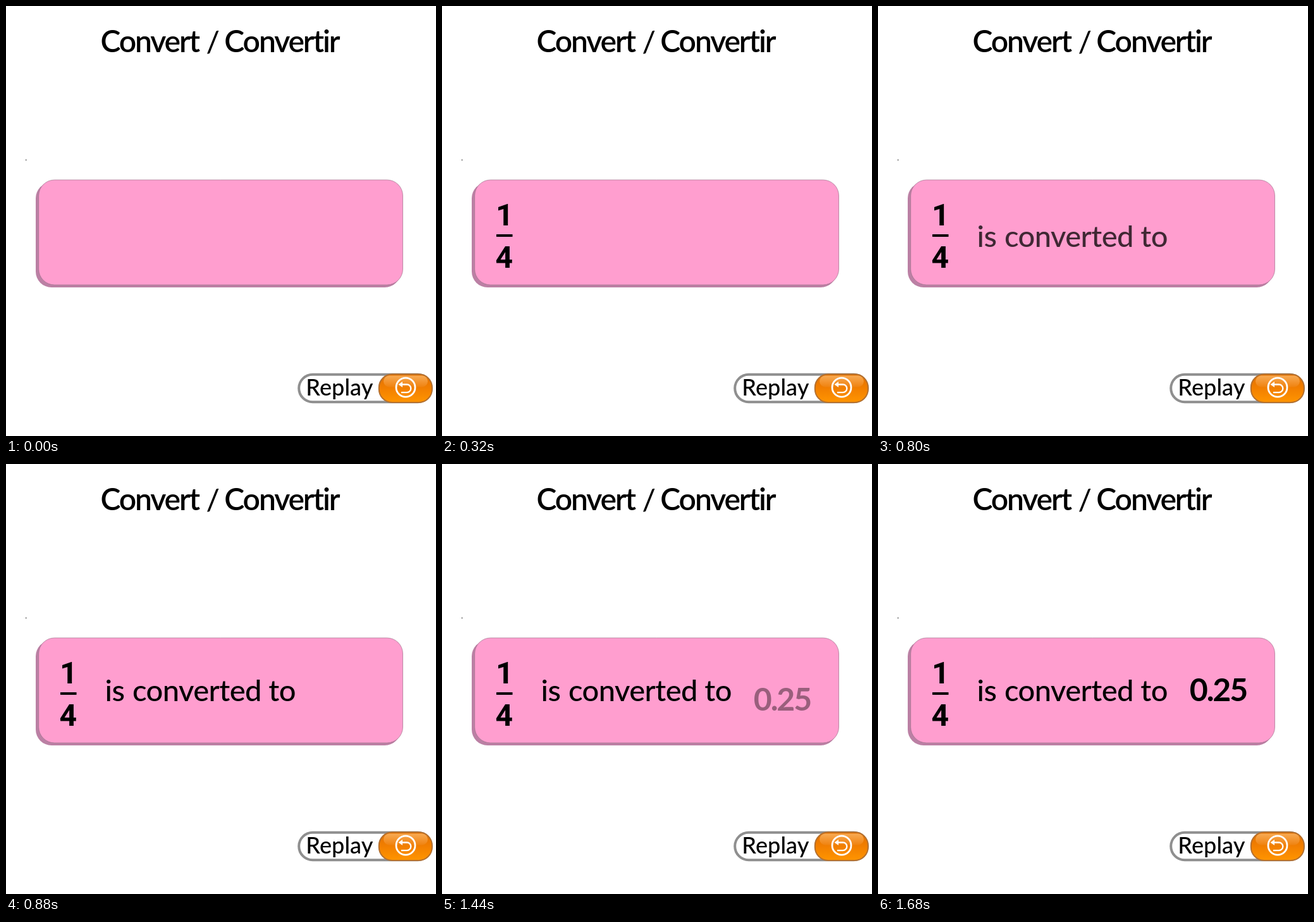
An HTML page with a canvas that plays this animation: 680x680 px, repeating every 2.48 s.

```html
<!DOCTYPE html>
<html lang="en">
<head>
<meta charset="utf-8">
<title>Convert / Convertir</title>
<style>
  html, body { margin: 0; width: 100%; height: 100%; overflow: hidden; background: #fff; }
  canvas { display: block; width: 100%; height: 100%; }
</style>
</head>
<body>
<canvas id="stage" width="680" height="680"></canvas>
<script>
const ctx = document.getElementById('stage').getContext('2d');
const LOOP = 2480, STEP = 80, RISE = 20;

const REGULAR = 'Lato, sans-serif';
const DIGITS = 'Roboto, sans-serif';

// Draws text with its ink centred on cx.
function text(str, cx, baseline, size, weight, family = REGULAR, spacing = 0) {
  ctx.font = `${weight} ${size}px ${family}`;
  ctx.letterSpacing = `${spacing}px`;
  const m = ctx.measureText(str);
  const x = cx + (m.actualBoundingBoxLeft - m.actualBoundingBoxRight) / 2;
  ctx.fillText(str, x, baseline);
}

function pill(x, y, w, h, r, fill, stroke, line = 1) {
  ctx.beginPath();
  ctx.roundRect(x, y, w, h, r);
  ctx.fillStyle = fill;
  ctx.fill();
  if (!stroke) return;
  ctx.strokeStyle = stroke;
  ctx.lineWidth = line;
  ctx.stroke();
}

function fade(y0, y1, ...colors) {
  const g = ctx.createLinearGradient(0, y0, 0, y1);
  colors.forEach((c, i) => g.addColorStop(i / (colors.length - 1), c));
  return g;
}

// Fades and lifts a part into place in a fixed number of hard steps.
function reveal(t, start, steps, draw) {
  const k = Math.min(steps, Math.floor((t - start) / STEP) + 1);
  if (k < 1) return;
  ctx.save();
  ctx.globalAlpha = k / steps;
  ctx.translate(0, RISE * (steps - k) / (steps - 1));
  ctx.fillStyle = '#000';
  draw();
  ctx.restore();
}

function title() {
  ctx.fillStyle = '#000';
  text('Convert', 229.5, 73, 48, 600, REGULAR, -2.1);
  text('/', 327, 73, 47, 500);
  text('Convertir', 438, 73, 48, 600, REGULAR, -2.1);
}

function panel() {
  pill(47, 279, 577, 166, 25, '#bb80a4');
  pill(51.7, 275, 575.8, 166, 25, '#ff9ecf', '#a0708c', 0.7);
  ctx.fillStyle = '#555';
  ctx.fillRect(31, 242.5, 1.3, 2);
}

function replayIcon() {
  ctx.strokeStyle = ctx.fillStyle = '#fff';
  ctx.lineWidth = 2.8;
  ctx.beginPath();
  ctx.arc(632, 603.2, 15, 0, Math.PI * 2);
  ctx.stroke();

  ctx.lineWidth = 2.4;
  ctx.beginPath();
  ctx.moveTo(625, 598.5);
  ctx.lineTo(634, 598.5);
  ctx.arc(634, 604.8, 6.3, -Math.PI / 2, Math.PI / 2);
  ctx.lineTo(625, 611.1);
  ctx.stroke();

  ctx.beginPath();
  ctx.moveTo(620.5, 598.5);
  ctx.lineTo(627, 594);
  ctx.lineTo(627, 603);
  ctx.fill();
}

function button() {
  pill(463.2, 582.7, 209.6, 43.6, 21.8, '#fff', '#8f8f8f', 4);
  ctx.fillStyle = '#000';
  text('Replay', 529, 616, 36, 500, REGULAR, 0.1);
  pill(589.8, 582.3, 84, 44.6, 21, fade(582, 627, '#e27000', '#f27f00', '#ff9500'), '#b4702f', 2);
  pill(597, 584.5, 70, 18, 9, fade(584, 602, '#f8ab55', '#f08412'));
  replayIcon();
}

function fraction() {
  text('1', 97, 347, 49, 600, DIGITS);
  ctx.fillRect(86, 361, 25.5, 4);
  text('4', 98.5, 414, 48, 700, DIGITS);
}

function phrase() {
  text('is', 172.5, 374.5, 47, 500, REGULAR, -0.5);
  text('converted', 301.5, 374.5, 47, 500, REGULAR, -0.5);
  text('to', 436, 374.5, 47, 500, REGULAR, -0.5);
}

function decimal() {
  text('0.25', 538.5, 374.5, 50, 700, REGULAR, -2.2);
}

function frame(now) {
  const t = now % LOOP;
  ctx.fillStyle = '#fff';
  ctx.fillRect(0, 0, 680, 680);
  title();
  panel();
  button();
  reveal(t, 80, 4, fraction);
  reveal(t, 640, 4, phrase);
  reveal(t, 1360, 5, decimal);
}

const began = performance.now();
function tick() {
  frame(performance.now() - began);
  requestAnimationFrame(tick);
}
tick();
</script>
</body>
</html>
```
